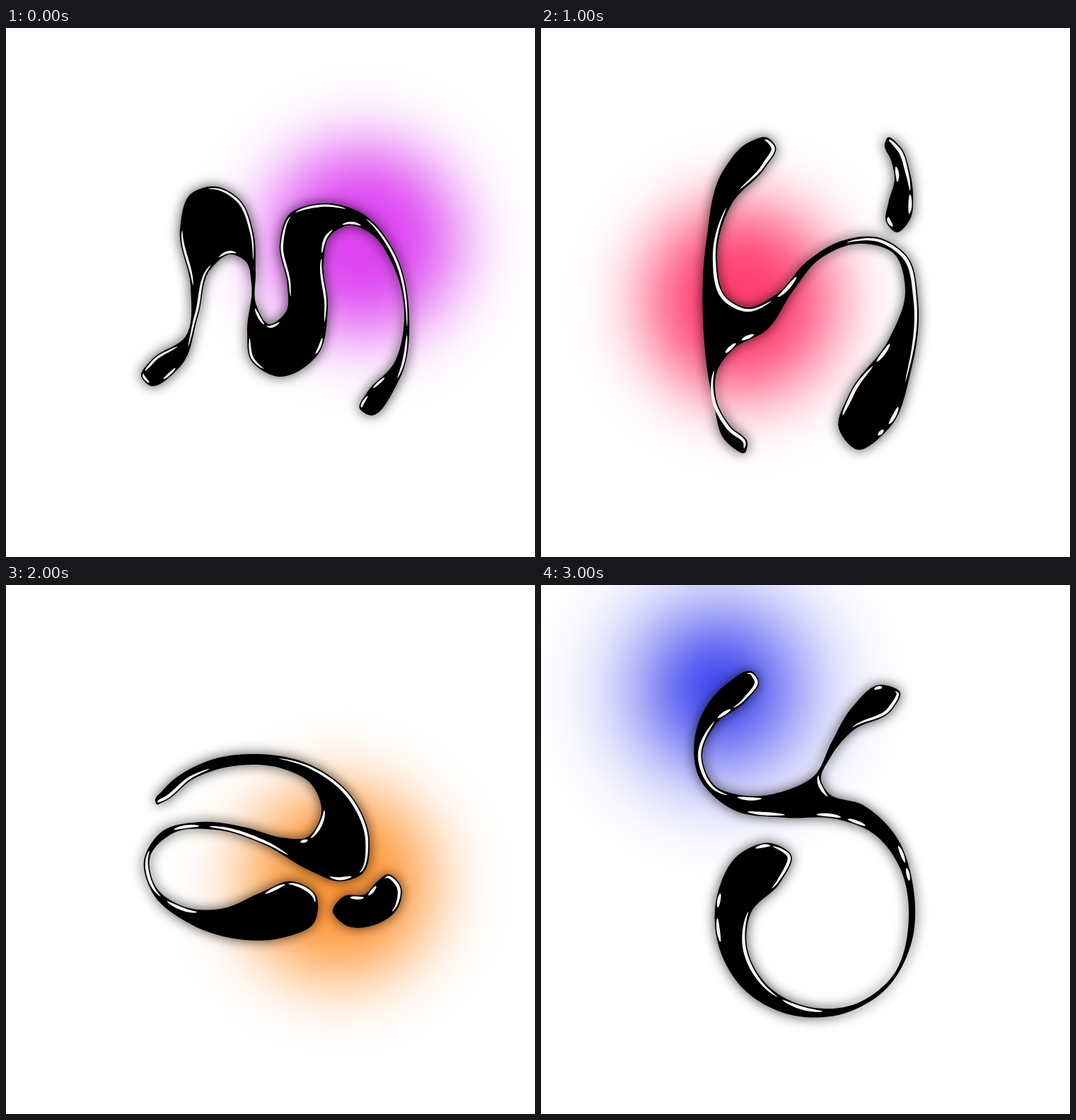
An HTML page for the animation above (4000 ms loop, 748 px wide and 748 px high).

```html
<!DOCTYPE html>
<html lang="en">
<head>
<meta charset="utf-8">
<title>Liquid letters</title>
<style>
  html, body { margin: 0; width: 100%; height: 100%; overflow: hidden; background: #fff; }
  svg { display: block; width: 100%; height: 100%; }
  .scene { visibility: hidden; animation: turn 4s step-end infinite; animation-delay: calc((var(--i) - 4) * 1s); }
  .ink { fill: #000; filter: drop-shadow(0 0 9px rgba(0, 0, 0, .72)); }
  .shine { fill: #f4f4f4; filter: blur(.6px); }
  @keyframes turn {
    0% { visibility: visible; }
    25%, 100% { visibility: hidden; }
  }
</style>
</head>
<body>
<!-- data-shine: spans of the outline, counted in its points, that carry a highlight -->
<svg viewBox="0 0 748 748">
  <defs id="defs"></defs>

  <g class="scene" style="--i:0" data-glow="505 300 #dd44f1" data-fade=".53 3" data-width="3.5">
    <g class="ink">
      <path data-outline="296 224 330 242 350 290 353 345 354 392 372 419 396 401 398 365 387 305 400 264 445 248 505 263 549 316 570 405 556 497 512 547 500 538 510 516 548 475 563 415 547 335 515 290 486 279 457 295 449 330 455 395 440 463 385 493 346 469 341 430 347 362 339 330 318 320 290 340 272 405 246 479 202 505 191 492 205 470 254 436 261 365 246 285 262 234"
        data-shine="-.3 2.7 31.7 32.5 32.9 34.6 40 41 36.1 37.2 37.4 38.7 35.1 35.5 4.1 4.8 4.9 5.5 27.5 28.8 6.6 9 9.2 10.6 11.1 13.2 13.3 14 21.5 22.3 22.7 23.7 23.9 25.3 25.6 26 16 16.9 17.2 17.6"/>
    </g>
  </g>

  <g class="scene" style="--i:1" data-glow="282 386 #ff4070" data-fade=".53 3" data-width="5">
    <g class="ink">
      <path data-outline="320 155 332 168 318 196 270 248 249 325 263 381 290 395 332 377 376 330 425 301 480 297 518 323 533 385 523 485 492 566 446 596 421 566 436 517 492 440 515 372 499 319 450 305 395 326 356 372 319 427 272 454 249 485 248 525 268 563 292 587 289 600 262 585 244 530 230 430 234 300 258 201 295 161"
        data-shine="-.2 2.7 3.1 6.8 7 7.6 9.1 13.2 24.85 25.3 24.35 24.7 26 29.6 16.4 17.55 17.62 17.95 14.12 14.3 13.6 13.95"/>
      <path data-outline="490 155 508 168 521 202 526 235 521 272 503 289 488 274 491 248 500 212 495 187 486 164"
        data-shine="0 2.85 3 3.75 7.85 8.6 5.5 6.3"/>
    </g>
  </g>

  <g class="scene" style="--i:2" data-glow="470 422 #ff983a" data-fade=".53 3" data-width="4.4">
    <g class="ink">
      <path data-outline="211 306 222 290 285 249 355 239 430 254 489 299 514 362 504 408 474 419 430 404 365 367 295 346 236 351 204 383 212 427 252 455 308 457 360 435 405 419 438 438 436 477 390 499 330 501 262 480 207 435 195 390 220 349 275 335 340 343 390 357 425 357 446 322 432 282 392 260 330 255 265 274 222 307 213 310"
        data-shine="34.6 36.8 3.4 7.1 7.5 8.4 30.1 31.1 29.7 30 11.35 11.95 9.5 11.15 12.85 14.3 14.5 15.35 17.1 17.75 17.85 19.3"/>
      <path data-outline="540 409 558 425 555 455 523 480 480 481 462 461 478 440 508 437 524 420"
        data-shine="-.4 2.3 7.1 7.8 6.3 6.9"/>
    </g>
  </g>

  <g class="scene" style="--i:3" data-glow="252 147 #464cf0" data-fade=".47 2" data-width="4.6">
    <g class="ink">
      <path data-outline="300 123 308 135 290 164 247 197 228 240 245 283 290 298 345 291 386 270 411 222 440 173 480 141 508 152 495 178 442 205 409 244 396 276 405 293 455 311 501 354 526 425 524 505 490 569 428 606 350 607 285 570 250 506 250 435 280 381 325 365 354 382 338 421 297 463 291 510 318 564 372 595 440 594 497 553 520 470 508 401 472 353 418 331 345 329 270 317 223 271 221 200 260 142"
        data-shine="-.3 2.4 2.45 2.85 2.95 5.5 5.75 6.4 42 42.7 11.7 14 10.75 11.1 15.8 17.1 40.9 41.4 40.3 40.75 19.2 19.55 19.65 19.9 28.5 29 29.1 31.25 26.7 27 26 26.5 32 34.4 34.5 35.4"/>
    </g>
  </g>
</svg>
<script>
  const NS = "http://www.w3.org/2000/svg";

  function add(parent, tag, attrs, first) {
    const el = document.createElementNS(NS, tag);
    for (const key in attrs) el.setAttribute(key, attrs[key]);
    parent.insertBefore(el, first ? parent.firstChild : null);
    return el;
  }

  function pairs(text) {
    const nums = text.trim().split(/\s+/).map(Number);
    return nums.flatMap((x, i) => i % 2 ? [] : [[x, nums[i + 1]]]);
  }

  const gap = (p, q) => Math.hypot(q[0] - p[0], q[1] - p[1]);

  // Closed smooth curve; tangents are weighted by the spacing of the points
  function spline(pts) {
    const n = pts.length;
    const at = i => pts[((i % n) + n) % n];
    const slope = (i, k) => {
      const [a, b, c] = [at(i - 1), at(i), at(i + 1)];
      const h = gap(a, b), g = gap(b, c);
      return ((b[k] - a[k]) / h * g + (c[k] - b[k]) / g * h) / (h + g);
    };
    return u => {
      const i = Math.floor(u), t = u - i, s = 1 - t;
      const b = at(i), c = at(i + 1), h = gap(b, c);
      return [0, 1].map(k =>
        s * s * (1 + 2 * t) * b[k] + t * t * (3 - 2 * t) * c[k] +
        h * t * s * (s * slope(i, k) - t * slope(i + 1, k)));
    };
  }

  const sample = (fn, from, to, count) =>
    Array.from({ length: count + 1 }, (_, i) => fn(from + (to - from) * i / count, i / count));

  const polygon = pts => "M" + pts.map(p => p.map(v => v.toFixed(2))).join("L") + "Z";

  // Highlight just inside the edge, thinning towards both ends
  function shine(point, from, to, width) {
    const count = Math.ceil((to - from) * 10) + 8;
    const side = sign => sample((u, k) => {
      const p = point(u - .01), q = point(u + .01), [x, y] = point(u);
      const half = width / 2 * Math.sqrt(Math.max(0, Math.sin(Math.PI * k)));
      const r = (1.6 + width / 2 + sign * half) / gap(p, q);
      return [x - (q[1] - p[1]) * r, y + (q[0] - p[0]) * r];
    }, from, to, count);
    return polygon([...side(1), ...side(-1).reverse()]);
  }

  document.querySelectorAll(".scene").forEach((scene, i) => {
    const { glow, fade, width } = scene.dataset;
    const gloss = add(scene, "g", { class: "shine" });

    for (const path of scene.querySelectorAll(".ink path")) {
      const pts = pairs(path.dataset.outline);
      const point = spline(pts);
      path.setAttribute("d", polygon(sample(point, 0, pts.length, pts.length * 10)));
      for (const [from, to] of pairs(path.dataset.shine)) {
        add(gloss, "path", { d: shine(point, from, to, +width) });
      }
    }

    const [cx, cy, color] = glow.split(" ");
    const [reach, power] = fade.split(" ").map(Number);
    const grad = add(document.getElementById("defs"), "radialGradient", { id: "glow" + i });
    sample(r => add(grad, "stop", {
      offset: r,
      "stop-color": color,
      "stop-opacity": Math.exp(-((r / reach) ** power)) * (1 - r ** 8)
    }), 0, 1, 20);
    add(scene, "circle", { cx, cy, r: 272, fill: `url(#glow${i})` }, true);
  });
</script>
</body>
</html>
```
